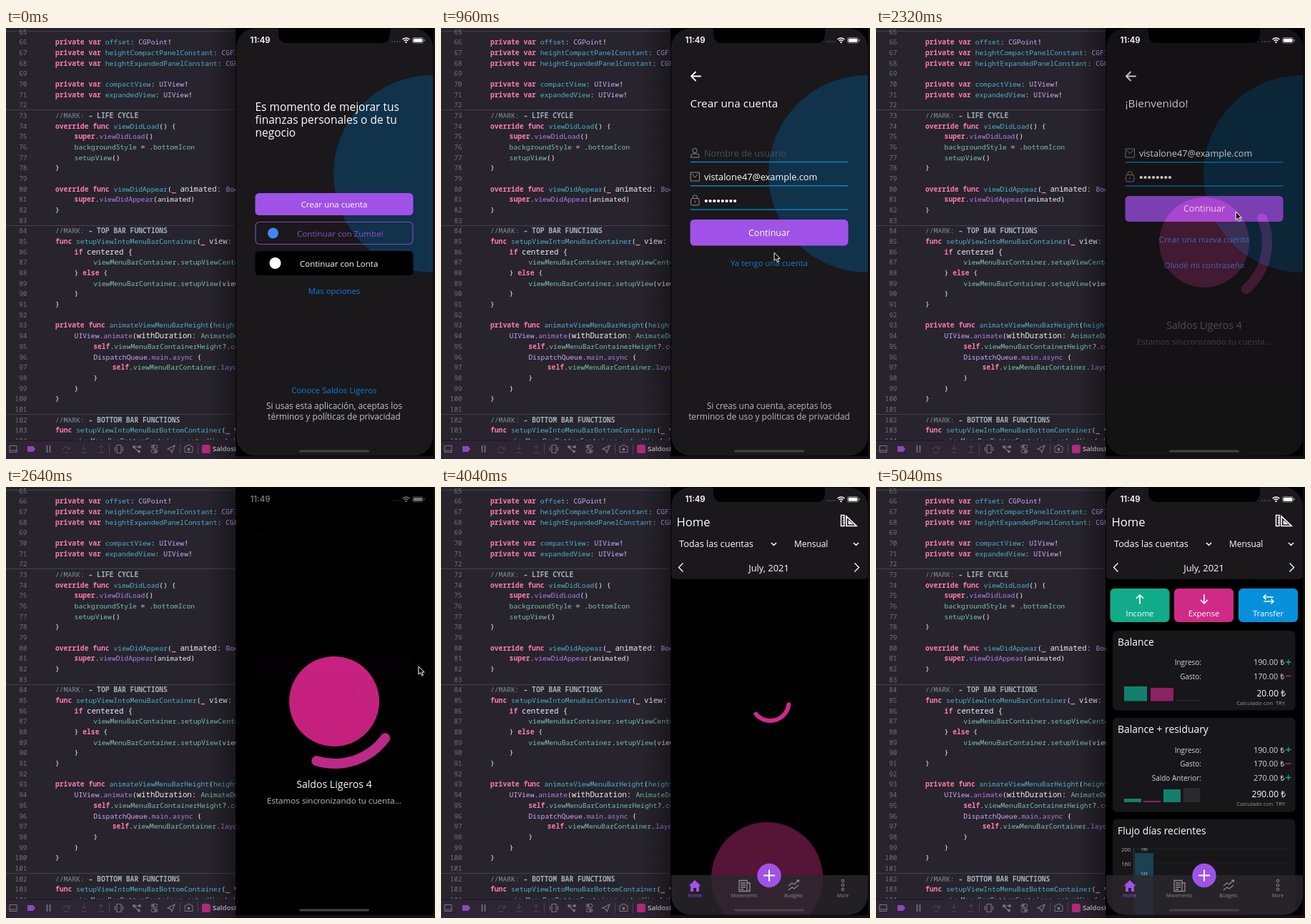
An HTML page for the animation above (5080 ms loop, 600 px wide and 603 px high).

```html
<!DOCTYPE html>
<html lang="es">
<head>
<meta charset="utf-8">
<style>
html, body { margin: 0; width: 100%; height: 100%; overflow: hidden; background: #111013; }
svg { display: block; width: 600px; height: 603px; }
text { font-family: "Open Sans", "Noto Sans", sans-serif; white-space: pre; }
.code text { font: 500 9.7px "Noto Sans Mono", "DejaVu Sans Mono", monospace; }
.code .num { font-weight: 400; font-size: 9.4px; }
.code .wide { font-size: 10.7px; }
.code .bold { font-weight: 700; }
</style>
</head>
<body>
<svg id="stage" viewBox="0 0 600 603"></svg>
<script>
const LOOP = 5080;
const PURPLE = '#a052e8', PINK = '#cf2a86', TEAL = '#12ab8a', PANEL = '#1a181a', CARD = '#171619';

// ---------- markup helpers ----------
const text = (x, y, size, str, fill = '#fff', anchor = 'start', extra = '') =>
  `<text x="${x}" y="${y}" font-size="${size}" fill="${fill}" text-anchor="${anchor}" ${extra}>${str}</text>`;
const mid = (y, size, str, fill) => text(459, y, size, str, fill, 'middle');
const box = (x, y, w, h, r, fill, extra = '') =>
  `<rect x="${x}" y="${y}" width="${w}" height="${h}" rx="${r}" fill="${fill}" ${extra}/>`;
const disc = (x, y, r, fill) => `<circle cx="${x}" cy="${y}" r="${r}" fill="${fill}"/>`;
const hoop = (x, y, r, color) => `<circle cx="${x}" cy="${y}" r="${r}" fill="none" stroke="${color}"/>`;
const line = (d, color = '#fff', w = 1, extra = '') =>
  `<path d="${d}" fill="none" stroke="${color}" stroke-width="${w}" ${extra}/>`;
const round = 'stroke-linecap="round" stroke-linejoin="round"';
const group = (id, body) => `<g id="${id}">${body}</g>`;

// ---------- code editor ----------
const TOKENS = {
  k: ['#ff7ab2', 'bold'], d: ['#4eb0cc', ''], t: ['#d0a8ff', ''], s: ['#b281eb', ''],
  m: ['#78c2b3', ''], w: ['#f0f0f2', ''], W: ['#f0f0f2', 'wide'], c: ['#7f8c98', ''], b: ['#a3b1bf', 'bold']
};
const CODE = {
  66: '0^kprivate var ^doffset^w: ^tCGPoint^w!',
  67: '0^kprivate var ^dheightCompactPanelConstant^w: ^tCGFloat',
  68: '0^kprivate var ^dheightExpandedPanelConstant^w: ^tCGFloat',
  70: '0^kprivate var ^dcompactView^w: ^tUIView^w!',
  71: '0^kprivate var ^dexpandedView^w: ^tUIView^w!',
  73: '0^c//MARK: ^b– LIFE CYCLE',
  74: '0^koverride func ^dviewDidLoad^w() {',
  75: '1^ksuper^w.^sviewDidLoad^w()',
  76: '1^mbackgroundStyle^w = .^mbottomIcon',
  77: '1^msetupView^w()',
  78: '0^w}',
  80: '0^koverride func ^dviewDidAppear^w(^k_ ^Wanimated: ^tBool',
  81: '1^ksuper^w.^sviewDidAppear^w(animated)',
  82: '0^w}',
  84: '0^c//MARK: ^b– TOP BAR FUNCTIONS',
  85: '0^kfunc ^dsetupViewIntoMenuBarContainer^w(^k_ ^Wview: ',
  86: '1^kif ^Wcentered {',
  87: '2^mviewMenuBarContainer^w.^msetupViewCentered',
  88: '1^w} ^kelse ^w{',
  89: '2^mviewMenuBarContainer^w.^msetupView^w(view)',
  90: '1^w}',
  91: '0^w}',
  93: '0^kprivate func ^danimateViewMenuBarHeight^w(^dheight',
  94: '1^tUIView^w.^sanimate^w(^WwithDuration: ^mAnimateDuration',
  95: '2^kself^w.^mviewMenuBarContainerHeight^w?.^sconstant',
  96: '2^tDispatchQueue^w.^smain^w.^sasync ^w{',
  97: '3^kself^w.^mviewMenuBarContainer^w.^slayoutIfNeeded',
  98: '2^w}',
  99: '1^w}',
  100: '0^w}',
  102: '0^c//MARK: ^b– BOTTOM BAR FUNCTIONS',
  103: '0^kfunc ^dsetupViewIntoMenuBarBottomContainer^w(^k_ ^Wview',
  104: '1^mviewMenuBarBottomContainer^w.^msetupView^w(view)'
};

function codeRow(n) {
  const y = 23.4 + (n - 66) * 14.67;
  let out = `<text class="num" x="29.5" y="${y}" text-anchor="end" fill="#73717a">${n}</text>`;
  if (CODE[n]) {
    const [indent, ...parts] = CODE[n].split('^');
    const spans = parts.map(p => {
      const [fill, cls] = TOKENS[p[0]];
      return `<tspan fill="${fill}" class="${cls}">${p.slice(1)}</tspan>`;
    });
    out += `<text x="${69 + indent * 26.6}" y="${y}">${spans.join('')}</text>`;
  }
  return out;
}

function editor() {
  let rows = '';
  for (let n = 65; n <= 104; n++) rows += codeRow(n);
  const rules = [4.5, 114.5, 276.5, 540.5].map(y => line(`M0 ${y}H320`, '#45424c')).join('');
  const on = '#7a7482', off = '#4f4957';
  const icons =
    line('M5 584.5h10v9h-10zM5 591h10', on) +
    '<path d="M30 585h8l3 4-3 4h-8z" fill="#8c49b8"/>' +
    line('M57.5 584v10M61.5 584v10', on, 1.6) +
    line('M79 590q5-8 10-1M89 585v4h-4M80 594h8', off) +
    line('M109 583v7M106 587l3 3 3-3M105 594h8', off) +
    line('M133 591v-7M130 587l3-3 3 3M129 594h8', off) +
    line('M144.5 582v14M243.5 582v14M268.5 582v14', '#4b4554') +
    line('M155 583.5h6v11h-6zM152.5 586v6M163.5 586v6', on, 1.2) +
    line('M180 586l6 0M179 587l6 5', on, 1.2) + disc(179, 586, 2, on) + disc(187, 586, 2, on) + disc(186, 592.5, 2, on) +
    box(203, 583.5, 9, 4.5, 2.2, 'none', `stroke="${on}"`) + box(203, 590, 9, 4.5, 2.2, 'none', `stroke="${on}"`) +
    disc(206, 585.7, 1.6, on) + disc(209, 592.2, 1.6, on) +
    line('M226 589l10-5-4 10-2-4z', on, 1.2) +
    line('M250 585.5h2.5l1-2h4l1 2h2.5v8h-11z', on) + disc(255.5, 589.5, 2, on) +
    box(274, 583, 12, 12, 2.5, '#b02a78') +
    text(289, 592.3, 9.6, 'SaldosLigeros', '#d8d4dc', 'start', 'font-weight="600"');
  return box(0, 0, 321, 603, 0, '#27242d') +
    `<g clip-path="url(#left)"><g class="code">${rules}${rows}</g>` +
    box(0, 577, 321, 26, 0, '#2d2533') + line('M0 577H321', '#18151b') + icons +
    box(280, 0, 41, 603, 0, 'url(#shade)') + '</g>';
}

// ---------- phone screens ----------
const button = (y, h, fill, label, size = 11.6) =>
  box(348.5, y, 221, h, 5.5, fill) + mid(y + h / 2 + 4.3, size, label);
const backArrow = line('M363 67.5H350.5M356 61.5l-6 6 6 6', '#fff', 1.8, round);
const under = y => line(`M348.5 ${y}H569.5`, '#0a7fbd', 1.4);
const FIELD = '#8b898c';
const mail = y => line(`M349 ${y - 6}h12.5v12h-12.5zM351 ${y - 4}l4 5 5-5`, FIELD);
const lock = y => box(349.5, y - 3, 11.5, 9.5, 2, 'none', `stroke="${FIELD}"`) +
  line(`M352 ${y - 3}v-1.5a3.2 3.2 0 0 1 6.5 0v1.5M355.2 ${y}v3`, FIELD);

function credentials(y) {
  let dots = '';
  for (let i = 0; i < 8; i++) dots += disc(370.8 + i * 5.75, y + 34, 2.1, '#fff');
  return mail(y) + text(368, y + 5, 12.7, 'vistalone47@example.com') + under(y + 12.8) +
    lock(y + 33.5) + dots + under(y + 46);
}

const welcome =
  ['Es momento de mejorar tus', 'finanzas personales o de tu', 'negocio']
    .map((s, i) => text(348.5, 115.5 + i * 18.4, 15.5, s)).join('') +
  button(231, 31, PURPLE, 'Crear una cuenta') +
  box(349, 271.5, 220, 31, 5.5, 'none', 'stroke="#8245bd" stroke-width="1.2"') +
  disc(373.5, 287, 7.5, '#4285f4') + text(407, 291.5, 11.6, 'Continuar con Zumbel', '#8e4bd0') +
  box(348.5, 312, 221, 34, 5.5, '#000') +
  disc(376.5, 329, 8, '#fff') + text(411, 333.5, 11.5, 'Continuar con Lonta') +
  mid(372, 11.3, 'Mas opciones', '#0d7fe0') +
  mid(511, 11.5, 'Conoce Saldos Ligeros', '#0d7fe0') +
  mid(533, 11.9, 'Si usas esta aplicación, aceptas los', '#c6c4c6') +
  mid(547.5, 11.9, 'términos y políticas de privacidad', '#c6c4c6');

const create = backArrow + text(348.5, 111, 15.3, 'Crear una cuenta') +
  hoop(355, 171.5, 3.2, FIELD) + line('M349.5 181v-2q0-3 3-3h5.5q3 0 3 3v2z', FIELD) +
  text(368, 180, 12.7, 'Nombre de usuario', '#4f4d52') + under(187.5) + credentials(208) +
  button(268, 36.5, PURPLE, 'Continuar', 12.5) +
  mid(333, 11.4, 'Ya tengo una cuenta', '#1180c2') +
  mid(533, 11.9, 'Si creas una cuenta, aceptas los', '#b9b7b9') +
  mid(547.5, 11.9, 'terminos de uso y politicas de privacidad', '#b9b7b9');

const login = backArrow + text(348.5, 111, 15.3, '¡Bienvenido!') + credentials(175) +
  button(235, 36, PURPLE, 'Continuar', 12.5) +
  mid(300, 11.4, 'Crear una nueva cuenta', '#1180c2') +
  mid(336, 11.4, 'Olvidé mi contraseña', '#1180c2');

const sync = box(321, 0, 277, 600, 0, '#000') + disc(459, 300, 63, '#c8217f') +
  '<path id="ring" fill="none" stroke-width="14" stroke-linecap="round"/>' +
  mid(420.5, 14.1, 'Saldos Ligeros 4') + mid(443, 11.6, 'Estamos sincronizando tu cuenta...', '#c2c0c2');

const action = (x, fill, icon, label) =>
  box(x, 142, 83, 47, 6, fill) + line(icon, '#fff', 1.7, round) + text(x + 41.5, 181, 11.2, label, '#fff', 'middle');

const amount = (y, label, value, sign) =>
  text(455, y, 10, label, '#d6d4d6', 'end') + text(571.5, y, 11, value + ' ₺', '#d6d4d6', 'end') +
  line(`M573 ${y - 4}h7.5` + (sign > 0 ? `M576.75 ${y - 7.7}v7.5` : ''), sign > 0 ? TEAL : PINK, 1.3);

const total = (y, value) => text(573, y, 12, value + ' ₺', '#fff', 'end') +
  text(572.5, y + 12.5, 7.8, 'Calculado con  TRY', '#9a989c', 'end');

// x, width, base, height, colour
const BARS = [
  [347, 32, 299.5, 20.5, '#12806c'], [384, 32, 299.5, 18.5, '#8b2262'], [421, 32, 299.5, 1.5, '#2b292d'],
  [347, 24, 441, 5, '#12806c'], [374, 24, 441, 2, '#8b2262'], [402, 24, 441, 18, '#12806c'], [430, 23.5, 441, 20, '#2b292d'],
  [362, 26, 599, 87, '#1b4153']
];

const cards =
  action(327.5, TEAL, 'M369 163v-12M364.5 155.5l4.5-4.5 4.5 4.5', 'Income') +
  action(417, PINK, 'M459 151v12M454.5 158.5l4.5 4.5 4.5-4.5', 'Expense') +
  action(507, '#0690dc', 'M555 154h-13M545 151l-3 3 3 3M543 160h13M553 157l3 3-3 3', 'Transfer') +
  box(331, 201, 255.5, 111.5, 6, CARD) + text(338, 221.5, 13.9, 'Balance') +
  amount(249, 'Ingreso:', '190.00', 1) + amount(268.5, 'Gasto:', '170.00', -1) + total(292.5, '20.00') +
  box(331, 323, 255.5, 131.5, 6, CARD) + text(338, 343.5, 13.9, 'Balance + residuary') +
  amount(371.5, 'Ingreso:', '190.00', 1) + amount(391, 'Gasto:', '170.00', -1) +
  amount(410.5, 'Saldo Anterior:', '270.00', 1) + total(433.5, '290.00') +
  box(331, 464.5, 255.5, 150, 6, CARD) + text(338, 485.5, 13.9, 'Flujo días recientes') +
  line('M360.5 506.5H580M360.5 527H580', '#2a282c', 0.7) + line('M360.5 504V600', '#4a484c', 0.7) +
  text(356, 509.5, 7.5, '200', '#bbb9bd', 'end') + text(356, 530, 7.5, '160', '#bbb9bd', 'end') +
  BARS.map((b, i) => `<rect id="bar${i}" x="${b[0]}" width="${b[1]}" fill="${b[4]}"/>`).join('') +
  text(375, 508.5, 5.5, '190', '#ddd', 'middle') + text(375, 543, 5.5, '123', '#ddd', 'middle');

const tab = (x, label, color, icon) => icon + text(x, 574, 6.7, label, color, 'middle');
const GRAY = '#8d8b90';
const tabs =
  box(321, 543, 277, 57, 0, '#2b282e', 'opacity="0.82"') +
  tab(355, 'Home', PURPLE, `<path d="M346.5 558l8.5-8 8.5 8h-2.5v8h-4v-5h-4v5h-4v-8z" fill="${PURPLE}"/>`) +
  tab(424, 'Movements', GRAY, line('M417 550.5h11v15h-11zM419 554h7M419 557h7M419 560h7M419 563h4M428 554h4v11.5h-4', GRAY, 1.3)) +
  tab(493, 'Budgets', GRAY, line('M486 558l5-4 3 2 6-6M497 550h3.5v3M486 564l5-4 3 2 6-5', GRAY, 1.2)) +
  tab(562, 'More', GRAY, [551, 557, 563].map(y => hoop(562, y, 1.8, GRAY)).join('')) +
  disc(459, 543.5, 16.7, PURPLE) + line('M451 543.5h16M459 535.5v16', '#fff', 2);

const home = box(321, 0, 277, 600, 0, '#000') + box(321, -10, 277, 139, 7, PANEL) +
  text(329.5, 54.5, 16.6, 'Home') +
  line('M559.5 39.5h4.5v15h-4.5zM562 43h2M562 46.5h2M562 50h2', '#fff', 1.5) +
  line('M567 41v13.5h14zM570.5 48v3.5h4z', '#fff', 1.7) +
  text(333, 84, 12.7, 'Todas las cuentas') + text(494, 84, 11.9, 'Mensual') +
  line('M462 78l3.5 3.5 3.5-3.5M577 78l3.5 3.5 3.5-3.5', '#fff', 1.5) +
  text(458.5, 117.5, 12.9, 'July, 2021', '#fff', 'middle') +
  line('M338.5 106.5l-6 6 6 6M578.5 106.5l6 6-6 6', '#fff', 1.4) +
  disc(456, 547, 78, '#561437') +
  '<path id="loader" fill="none" stroke="#cf2a86" stroke-width="6" stroke-linecap="round"/>' +
  group('cards', cards) + tabs;

const status = text(341.5, 21.2, 11.4, '11:49', '#fff', 'start', 'style="font-family:Inter,sans-serif;font-weight:600"') +
  [540, 543.5, 547, 550.5].map(x => disc(x, 19, 0.8, '#77757a')).join('') +
  line('M554.5 16q5-4 10 0', '#fff', 1.6) + line('M556.5 18q3-2.3 6 0', '#fff', 1.5) + disc(559.5, 20, 1.2, '#fff') +
  box(568.5, 13.5, 15, 7.5, 2, 'none', 'stroke="#9a989c" stroke-width="0.8"') +
  box(569.7, 14.7, 12.6, 5.1, 1, '#fff') + box(584.5, 15.7, 1.2, 3, 0.5, '#9a989c');

const arrow = '<path d="M0 0v11l2.6-2.3 1.9 4.3 2-.9-1.9-4.1h3.6z" fill="#000" stroke="#fff" stroke-width="1"/>';

document.getElementById('stage').innerHTML =
  '<defs><clipPath id="left"><path d="M0 0H321V603H0z"/></clipPath>' +
  '<clipPath id="screen"><rect x="322" y="0.5" width="275" height="598" rx="27"/></clipPath>' +
  '<linearGradient id="shade"><stop stop-opacity="0"/><stop offset="1" stop-opacity="0.35"/></linearGradient></defs>' +
  box(0, 0, 600, 603, 0, '#141216') + editor() +
  box(321, 0, 276.5, 599, 0, '#000') +
  '<g clip-path="url(#screen)">' + box(321, 0, 277, 600, 0, PANEL) + disc(596, 204, 138, '#10324a') +
  group('welcome', welcome) + group('create', create) + group('login', login) +
  group('sync', sync) + group('home', home) +
  '<path d="M377 0q4 0 4 4v4q0 13 13 13h130q13 0 13-13v-4q0-4 4-4z" fill="#000"/>' +
  group('status', status) + box(410, 590.5, 98, 3, 1.5, '#454347') + '</g>' +
  group('cursor', arrow);

// ---------- motion ----------
const el = id => document.getElementById(id);
const ramp = (t, a, b) => Math.min(1, Math.max(0, (t - a) / (b - a)));
const ease = p => p * p * (3 - 2 * p);
const fade = (t, a, b) => ease(ramp(t, a, b));
const show = (id, v) => {
  el(id).setAttribute('opacity', v);
  el(id).setAttribute('display', v > 0 ? 'inline' : 'none');
};

// Eased values between [time, ...values] keys
function track(keys, t) {
  let i = 0;
  while (i < keys.length - 2 && t >= keys[i + 1][0]) i++;
  const [a, b] = [keys[i], keys[i + 1]];
  const p = fade(t, a[0], b[0]);
  return a.slice(1).map((v, k) => v + (b[k + 1] - v) * p);
}

function arc(id, cx, cy, r, from, span) {
  const pt = deg => {
    const a = deg * Math.PI / 180;
    return `${cx + r * Math.cos(a)} ${cy + r * Math.sin(a)}`;
  };
  el(id).setAttribute('d', `M${pt(from)}A${r} ${r} 0 0 1 ${pt(from + span)}`);
}

const POINTER = [[60, 452, 262], [260, 458, 248], [520, 458, 248], [940, 466, 314], [1120, 468, 326],
  [1260, 468, 326], [1740, 471, 260], [2160, 471, 260], [2600, 577, 251], [2800, 577, 251]];
const RING = [[2600, 190, 40, 138], [3220, 243, 160, 52]];

function draw(t) {
  const toCreate = fade(t, 360, 760), toLogin = fade(t, 1180, 1580);
  show('welcome', 1 - toCreate);
  show('create', toCreate * (1 - toLogin));
  show('login', t < 2700 ? toLogin : 0);
  show('sync', t < 4100 ? fade(t, 2160, 2680) : 0);
  show('home', ramp(t, 3940, 4030));
  show('status', t < 3400 ? 1 - ramp(t, 2400, 2850) : ramp(t, 3940, 4030));

  arc('ring', 460, 300, 87, 36 + (t - 2640) * 0.184, 71);
  el('ring').setAttribute('stroke', `rgb(${track(RING, t).map(Math.round)})`);
  arc('loader', 460.5, 301, 26, 7 + (t - 4040) * 0.184, 133);
  show('loader', 1 - ramp(t, 4240, 4360));
  show('cards', fade(t, 4240, 4480));

  const grow = fade(t, 4400, 5000);
  BARS.forEach(([, , base, h], i) => {
    el('bar' + i).setAttribute('y', base - h * grow);
    el('bar' + i).setAttribute('height', h * grow);
  });

  show('cursor', ramp(t, 60, 100) * (1 - ramp(t, 2720, 2780)));
  el('cursor').setAttribute('transform', `translate(${track(POINTER, t)})`);
}

function tick() {
  draw(performance.now() % LOOP);
  requestAnimationFrame(tick);
}
tick();
</script>
</body>
</html>
```
